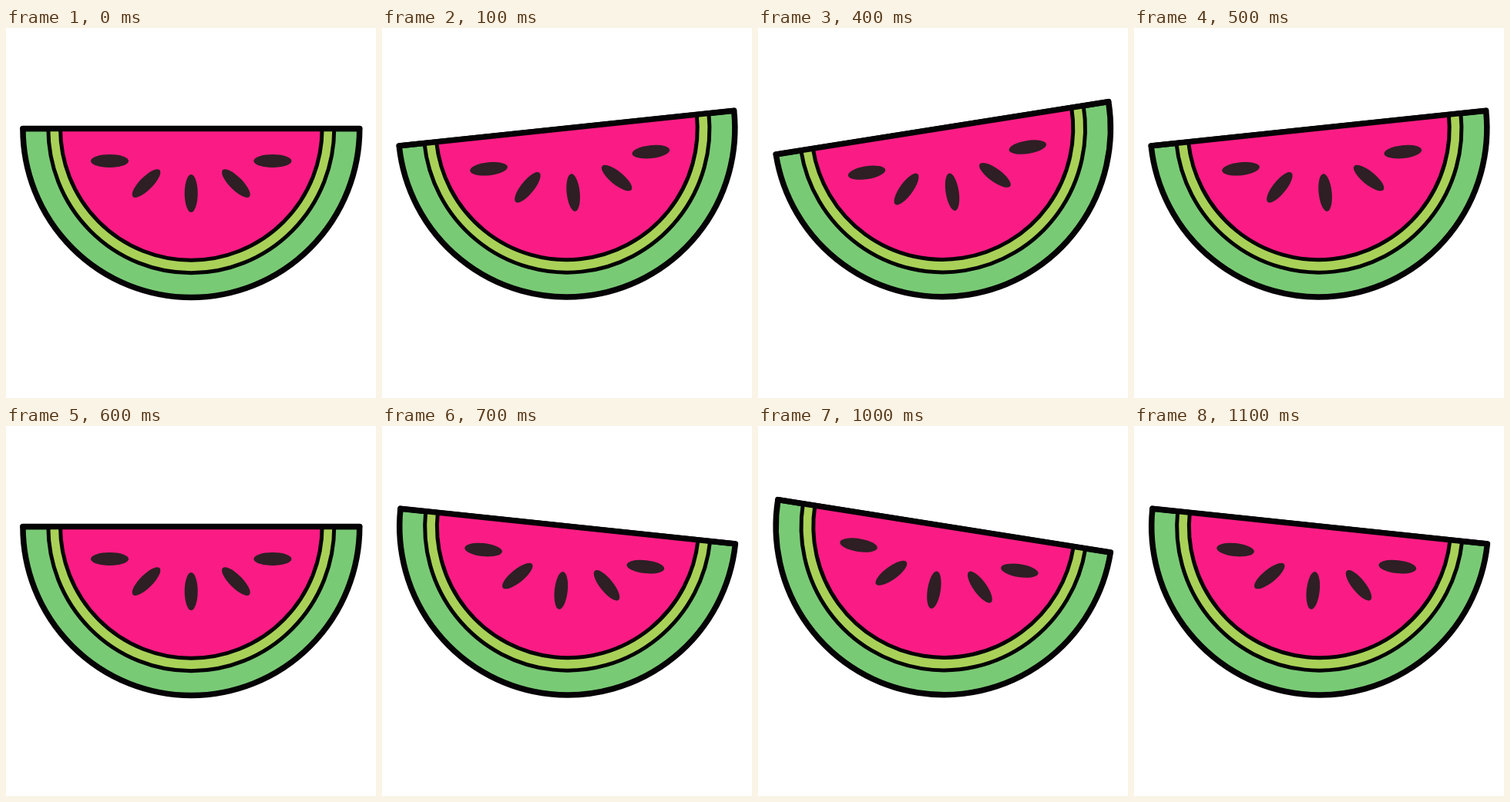
An HTML page for the animation above (1200 ms loop, 480x480 px).

```html
<!DOCTYPE html>
<html lang="en">
<head>
<meta charset="utf-8">
<title>Rocking watermelon</title>
<style>
  html, body { margin: 0; width: 100%; height: 100%; overflow: hidden; background: #fff; }
  svg { display: block; width: 100%; height: 100%; }
</style>
</head>
<body>
<svg viewBox="0 0 480 480">
  <g id="melon">
    <g id="rind" stroke="#050305" stroke-linejoin="round"></g>
    <g id="seeds" fill="#2d1f24"></g>
  </g>
</svg>
<script>
const NS = "http://www.w3.org/2000/svg";
const CENTER = { x: 240.3, y: 130.6 };
const PIVOT = { x: 240.3, y: 139 };
const STEP_MS = 100;
const SWING = [0, 6, 9, 10, 9, 6]; // degrees over one half of the rocking cycle

const melon = document.getElementById("melon");
const rind = document.getElementById("rind");
const seeds = document.getElementById("seeds");

function add(parent, tag, attributes) {
  const node = document.createElementNS(NS, tag);
  for (const name in attributes) node.setAttribute(name, attributes[name]);
  parent.appendChild(node);
}

function addHalf(rx, ry, fill, width) {
  const { x, y } = CENTER;
  add(rind, "path", {
    d: `M${x - rx} ${y}A${rx} ${ry} 0 0 0 ${x + rx} ${y}Z`,
    fill, "stroke-width": width
  });
}

function addSeed(x, y, angle) {
  add(seeds, "ellipse", {
    cx: x, cy: y, rx: 24.5, ry: 8.5, transform: `rotate(${angle} ${x} ${y})`
  });
}

addHalf(218.4, 218.9, "#79ca75", 7.5);
addHalf(185.5, 187.1, "#a9d158", 5);
addHalf(169.8, 170.6, "#fa1c84", 5);
// One even top edge across all layers
add(rind, "path", {
  d: `M${CENTER.x - 218.4} ${CENTER.y}h436.8`, "stroke-width": 7.2, "stroke-linecap": "round"
});

addSeed(134.5, 172.4, 0);
addSeed(182, 201.6, -45);
addSeed(240.2, 214.5, 90);
addSeed(298.4, 201.6, 45);
addSeed(345.9, 172.4, 0);

function render(ms) {
  const step = Math.floor(ms / STEP_MS) % (2 * SWING.length);
  const tilt = SWING[step % SWING.length];
  const angle = step < SWING.length ? -tilt : tilt;
  melon.setAttribute("transform",
    `translate(0 ${-tilt * 0.1}) rotate(${angle} ${PIVOT.x} ${PIVOT.y})`);
}

const start = performance.now();
function tick() {
  render(performance.now() - start);
  requestAnimationFrame(tick);
}
tick();
</script>
</body>
</html>
```
